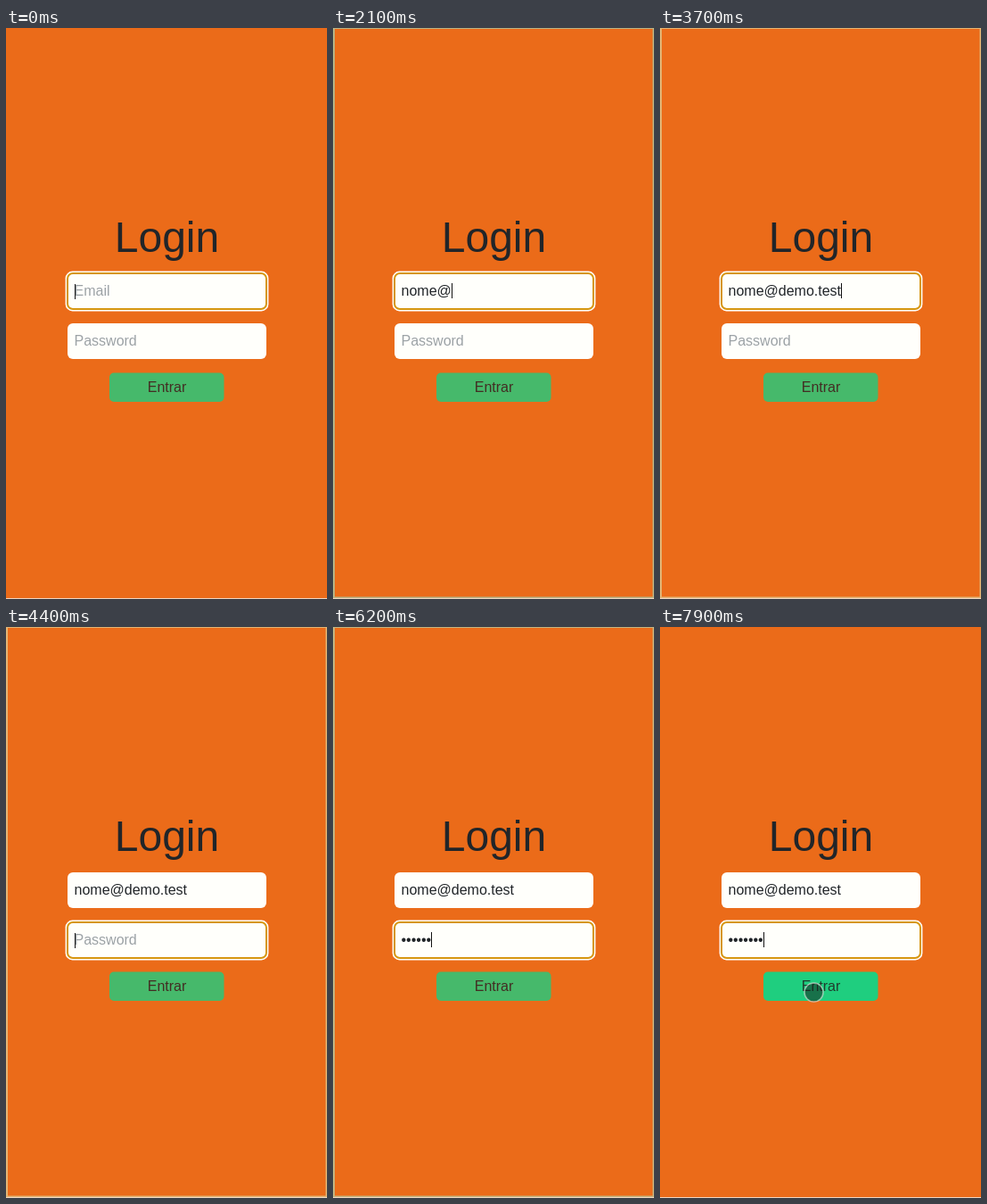
Write an HTML page with a canvas that moves like this. It is 360 px wide and 640 px high and loops after 8000 ms.

```html
<!DOCTYPE html>
<html lang="pt">
<head>
<meta charset="utf-8">
<title>Login</title>
<style>
  html, body { margin: 0; width: 100%; height: 100%; overflow: hidden; background: #eb6b19; }
  canvas { display: block; }
</style>
</head>
<body>
<canvas id="stage" width="360" height="640"></canvas>
<script>
const ctx = document.getElementById('stage').getContext('2d');
const LOOP = 8000, STEP = 100;
const EMAIL = 'nome@demo.test';
const INK = '#212529', WHITE = '#fffffb', ORANGE = '#eb6b19';
const TEXT_X = 76.5, CENTER = 180.5;
const PASSWORD_FOCUS = 4400, HOVER = 6800, TAP = 7900;

const progress = (t, start, end) => Math.min(1, Math.max(0, (t - start) / (end - start)));
const mix = (a, b, p) => a + (b - a) * p;

// Characters typed so far in one burst; a pace below 1 starts fast and slows down.
const typed = (t, start, end, count, pace) =>
  t < start ? 0 : 1 + Math.floor((count - 1) * progress(t, start, end) ** pace);

const emailLength = t =>
  typed(t, 1300, 1700, 4, 1) + typed(t, 2100, 2200, 1, 1) + typed(t, 2700, 3700, 9, 0.6);
const passwordLength = t => typed(t, 5000, 6500, 7, 0.75);

function box(x, y, w, h, r, color) {
  ctx.fillStyle = color;
  ctx.beginPath();
  ctx.roundRect(x, y, w, h, r);
  ctx.fill();
}

function text(str, x, y, color, size = 16, align = 'left') {
  ctx.font = `${size}px "Liberation Sans", Arial, sans-serif`;
  ctx.textAlign = align;
  ctx.fillStyle = color;
  ctx.fillText(str, x, y);
}

function field(y, value, placeholder, focused) {
  if (focused) {
    box(66.6, y - 2.4, 227.8, 44.8, 8, WHITE);
    box(68, y - 1, 225, 42, 7, '#d6960f');
    box(70, y + 1, 221, 38, 5, WHITE);
  } else {
    box(69, y, 223, 40, 6, WHITE);
  }
  text(value || placeholder, TEXT_X, y + 25, value ? INK : '#9ca2a6');
  if (focused) {
    const caret = Math.round(TEXT_X + ctx.measureText(value).width);
    ctx.fillStyle = '#111';
    ctx.fillRect(caret, y + (value ? 11 : 12), 1, 17);
  }
}

// While keys are pressed the stage has a frame that warms from green to tan.
function edges(t) {
  const start = t < 5000 ? 1300 : 5000;
  const end = t < 5000 ? 4800 : HOVER;
  if (t >= start && t < end) {
    const p = progress(t, start, start + 2400);
    ctx.fillStyle = `rgb(${mix(163, 226, p)}, ${mix(179, 182, p)}, ${mix(142, 118, p)})`;
    ctx.fillRect(0, 0, 360, 1);
    ctx.fillRect(0, 0, 2, 640);
    ctx.fillRect(358.5, 0, 1.5, 640);
    ctx.fillRect(0, 637.5, 360, 1.5);
  }
  ctx.fillStyle = '#f0d6c2';
  ctx.fillRect(0, 639, 360, 1);
}

// The pointer sweeps in from the right, overshoots, then settles for the tap.
function pointer(t) {
  const q = progress(t, HOVER, 7400) - 1;
  const swing = 1 + 3 * q ** 3 + 2 * q ** 2;
  const x = t < TAP ? mix(325, 190, swing) : 172.5;
  const y = mix(416, 409.5, Math.min(1, swing));
  ctx.beginPath();
  ctx.arc(x, y, 10.5, 0, Math.PI * 2);
  ctx.fillStyle = 'rgba(20, 28, 24, 0.52)';
  ctx.fill();
  ctx.lineWidth = 1.5;
  ctx.strokeStyle = 'rgba(215, 225, 215, 0.65)';
  ctx.stroke();
}

function draw(t) {
  ctx.fillStyle = ORANGE;
  ctx.fillRect(0, 0, 360, 640);
  edges(t);
  text('Login', CENTER, 251, INK, 48, 'center');

  const onPassword = t >= PASSWORD_FOCUS;
  field(275, EMAIL.slice(0, emailLength(t)), 'Email', !onPassword);
  field(331, '•'.repeat(passwordLength(t)), 'Password', onPassword);

  const hover = t >= HOVER;
  box(116, 386.5, 128.5, 32.5, 5, hover ? '#1fce7f' : '#46b96b');
  text('Entrar', CENTER, 408, hover ? '#213b2e' : '#432d23', 16, 'center');
  if (hover) pointer(t);
}

function tick() {
  const t = performance.now() % LOOP;
  draw(t - t % STEP);
  requestAnimationFrame(tick);
}
tick();
</script>
</body>
</html>
```
